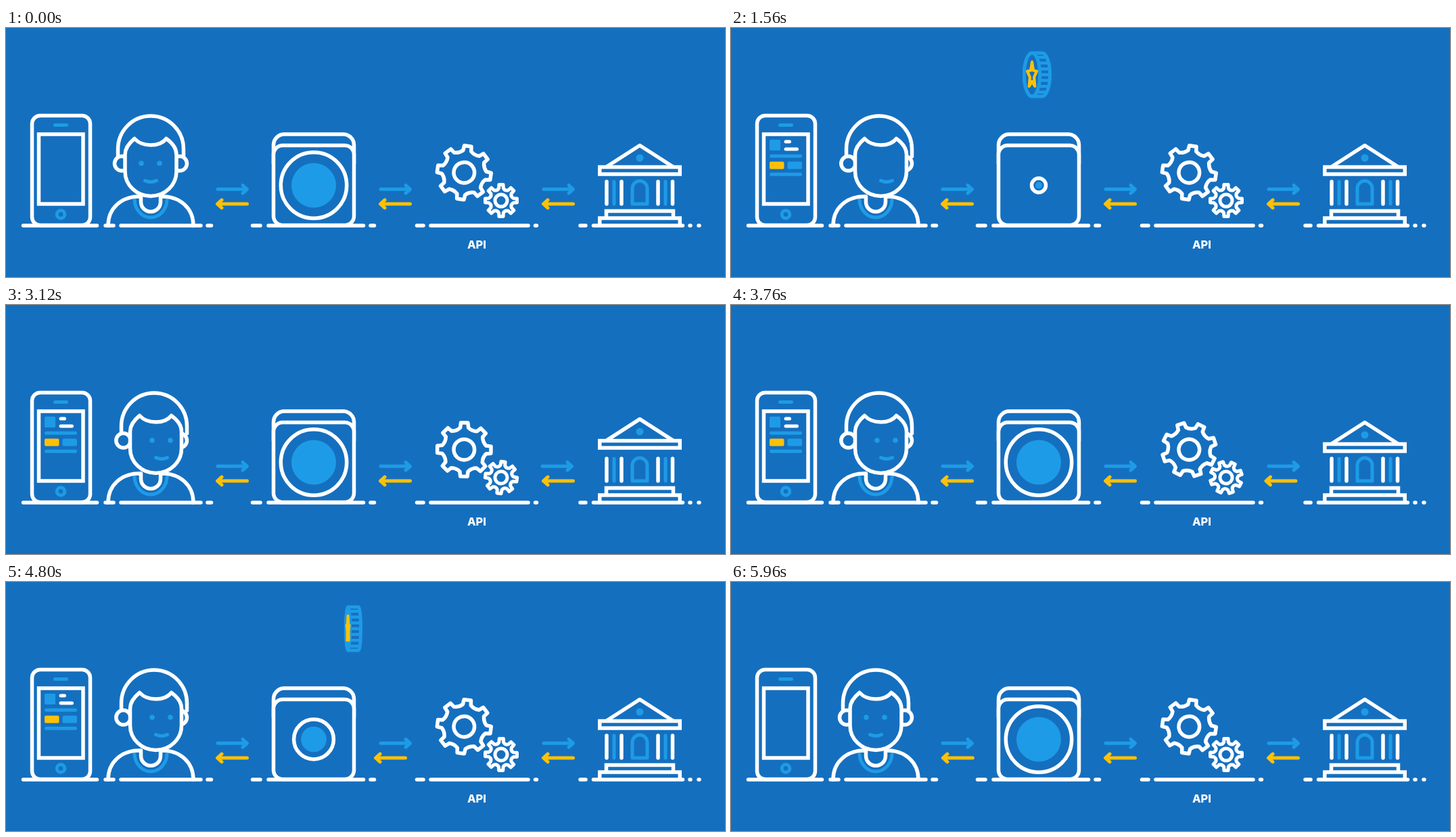
Recreate the animation shown at these times as an HTML page. Size 1063 by 368 pixels, loop 6000 ms.

```html
<!DOCTYPE html>
<html lang="en">
<head>
<meta charset="utf-8">
<title>API flow</title>
<style>
  html, body { margin: 0; width: 100%; height: 100%; overflow: hidden; background: #156fbf; }
  svg { display: block; width: 100%; height: 100%; }
  .l { fill: none; stroke: #fff; stroke-width: 5.5; stroke-linecap: round; stroke-linejoin: round; }
  .b { stroke: #1e9be6; stroke-width: 5; }
  .y { stroke: #ffc107; stroke-width: 5; }
  .s { fill: #156fbf; }
  .fb { fill: #1e9be6; }
  .fy { fill: #ffc107; }
  text { fill: #fff; font: 800 16.5px Inter, "Open Sans", sans-serif; text-anchor: middle; }
</style>
</head>
<body>
<svg viewBox="0 0 1063 368">
  <rect class="s" width="1063" height="368"/>

  <g id="coin">
    <path id="hull" class="l b s"/>
    <path id="ribs" class="l b" style="stroke-width:4.5;stroke-linecap:butt"/>
    <ellipse id="face" class="l b s" ry="32"/>
    <path id="star" class="l y" style="stroke-width:4.2"/>
  </g>

  <g id="phone">
    <rect class="l" x="38.5" y="129.5" width="86" height="162" rx="12"/>
    <rect class="l" x="48.5" y="157" width="65.5" height="103" style="stroke-linejoin:miter"/>
    <path class="l b" d="M72.5 143.5H89.5"/>
    <circle class="l b" cx="81" cy="275.5" r="5.8"/>
    <g id="items">
      <rect class="fb" x="57" y="165" width="16" height="16" rx="1.5"/>
      <path class="l" d="M81 168H86.5" style="stroke-width:5"/>
      <path class="l" d="M81 179H97.5" style="stroke-width:5"/>
      <path class="l b" d="M59.5 189.3H102.5"/>
      <rect class="fy" x="57" y="197.5" width="21.5" height="11" rx="2"/>
      <rect class="fb" x="83.5" y="197.5" width="21.5" height="11" rx="2"/>
      <path class="l b" d="M59.5 216.3H102.5"/>
    </g>
  </g>

  <g id="user">
    <path class="l b" d="M190 253A24 27 0 0 0 238 253"/>
    <path class="l" d="M151 292C151 266 171 249 197 249H199.500V257A14.500 14.500 0 0 0 228.500 257V249H231C257 249 277 266 277 292"/>
    <path id="hair" class="l" d="M165.500 190V179A48.500 49 0 0 1 262.500 179V190"/>
    <circle id="earL" class="l s" cy="200.3" r="10.700"/>
    <circle class="l s" cx="256.800" cy="200.3" r="10.700"/>
    <g id="head">
      <path class="l s" d="M176 212V187C176 177 182 170 190 163.500C196 170 204 173 214 173S232 170 237 163.500C246 170 252 177 252 187V212A38 36.500 0 0 1 176 212Z"/>
    </g>
    <g id="look">
      <ellipse class="fb" cx="200" cy="200" rx="3.8"/>
      <ellipse class="fb" cx="227" cy="200" rx="3.8"/>
      <path class="l b" d="M205.500 225.500Q214 229.500 222.500 225.500"/>
    </g>
  </g>

  <g id="wallet">
    <path class="l s" d="M395.500 200V173A16 16 0 0 1 411.500 157H498.500A16 16 0 0 1 514.500 173V200"/>
    <rect class="l s" x="395.500" y="173.500" width="119" height="118" rx="13.500"/>
    <circle id="ring" class="l s" cx="455" cy="232.500"/>
    <circle id="disc" class="fb" cx="455" cy="232.500"/>
  </g>

  <g id="gears">
    <g id="big"></g>
    <g id="small"></g>
  </g>
  <text x="696" y="325.5">API</text>

  <g id="bank">
    <g id="roof">
      <path class="l" d="M888 205L937 173.500L986 205"/>
      <circle class="fb" cx="937" cy="192" r="5.5"/>
      <rect class="l" x="877.800" y="205.500" width="118.500" height="10.500" style="stroke-linejoin:miter"/>
    </g>
    <path class="l" d="M888 227V260M910 227V260M964 227V260M985.500 227V260"/>
    <path class="l b" d="M899 227V260M975 227V260M926 260V237A11 11 0 0 1 948 237V260Z"/>
    <path class="l" d="M887.500 281V270.500H986.500V281M877.800 291.500V281H996.300V291.500" style="stroke-linejoin:miter"/>
  </g>

  <path class="l" d="M25.500 292H134.500M147 292H159M170 292H288M298 292H303.500M364.500 292H376M388 292H528.500M539 292H544.500M607.500 292H617M628 292H772M782.500 292H784.500M849 292H857M868.500 292H1000.500M1011 292h1M1024 292h1"/>
  <g id="arrows"></g>
</svg>
<script>
const $ = id => document.getElementById(id);
const set = (el, attrs) => { for (const k in attrs) el.setAttribute(k, attrs[k]); };
const mix = (a, b, u) => a + (b - a) * u;
const span = (t, a, b) => Math.min(1, Math.max(0, (t - a) / (b - a)));
const sine = u => (1 - Math.cos(Math.PI * u)) / 2;
const cubic = u => u < .5 ? 4 * u ** 3 : 1 - (2 - 2 * u) ** 3 / 2;
const back = u => 1 + 2.2 * (u - 1) ** 3 + 1.2 * (u - 1) ** 2;
const polar = (r, deg) => {
  const a = deg * Math.PI / 180;
  return (r * Math.sin(a)).toFixed(2) + ' ' + (-r * Math.cos(a)).toFixed(2);
};

function gear(tip, root, hole, width) {
  let d = '';
  for (let i = 0; i < 8; i++) {
    const a = i * 45;
    d += (i ? 'L' : 'M') + polar(root, a - 10.5) + 'L' + polar(tip, a - 7.5) +
      'L' + polar(tip, a + 7.5) + 'L' + polar(root, a + 10.5) +
      'Q' + polar(root - 3.5, a + 22.5) + ' ' + polar(root, a + 34.5);
  }
  const w = `style="stroke-width:${width}"`;
  return `<path class="l s" ${w} d="${d}Z"/><circle class="l" ${w} r="${hole}"/>`;
}
$('big').innerHTML = gear(40, 33, 15.3, 5.5);
$('small').innerHTML = gear(23.7, 18.5, 9, 5);

// direction and start time of each nudge
const arrows = [
  [0, 1, 360], [1, 1, 1660], [2, 1, 2520],
  [2, -1, 3680], [1, -1, 4560], [0, -1, 5240]
].map(([slot, dir, start]) => {
  const el = document.createElementNS('http://www.w3.org/2000/svg', 'path');
  set(el, dir > 0
    ? { class: 'l b', d: 'M313 238.300H356M350 232.500L356.500 238.300L350 244.100' }
    : { class: 'l y', d: 'M356.500 260H313M319 254.200L312.500 260L319 265.800' });
  $('arrows').append(el);
  return { el, x: slot * 241, dir, start };
});

// out, a small overshoot, then rest
function nudge(p) {
  if (p < 0 || p > 760) return 0;
  return p < 480 ? 7 * Math.sin(Math.PI * p / 480) : -2 * Math.sin(Math.PI * (p - 480) / 280);
}

function drawCoin(x, y, deg) {
  const a = deg * Math.PI / 180, c = Math.cos(a);
  const rx = Math.max(.5, 32 * Math.abs(c));
  const off = 8 * Math.sin(a) * (c < 0 ? -1 : 1);
  const side = off < 0 ? 1 : -1, h = Math.abs(off);
  $('coin').setAttribute('transform', `translate(${x} ${y})`);
  $('hull').setAttribute('d',
    `M${-h} -32H${h}A${rx} 32 0 0 1 ${h} 32H${-h}A${rx} 32 0 0 1 ${-h} -32Z`);
  let ribs = '';
  for (let k = -3; k <= 3; k++) {
    const yy = k * 8.6, edge = rx * Math.sqrt(1 - (yy / 32) ** 2);
    ribs += `M${off + side * edge} ${yy}h${side * 2 * h}`;
  }
  $('ribs').setAttribute('d', ribs);
  set($('face'), { cx: off, rx });
  let star = '';
  for (let i = 0; i < 10; i++) {
    const r = i % 2 ? 9 : 20, b = i * Math.PI / 5;
    star += (i ? 'L' : 'M') + (off + r * Math.sin(b) * rx / 32) + ' ' + (1 - r * Math.cos(b));
  }
  $('star').setAttribute('d', star + 'Z');
}

function coinAt(t) {
  const out = t > 1140 && t < 2420, home = t > 4080 && t < 5290;
  $('coin').style.display = out || home ? '' : 'none';
  if (out) {
    const x = mix(452.5, 675, sine(span(t, 1560, 2080)));
    const y = mix(mix(195, 69, sine(span(t, 1160, 1560))), 214, span(t, 2000, 2400) ** 2);
    drawCoin(x, y, -69 + (t - 1560) * .28);
  } else if (home) {
    const x = mix(673.5, 453.5, sine(span(t, 4500, 4963)));
    const y = mix(mix(214, 69, sine(span(t, 4100, 4540))), 192, span(t, 4963, 5287) ** 2);
    drawCoin(x, y, 50 - (t - 4320) * .28);
  }
}

const items = [...$('items').children].map(el => ({ el, box: el.getBBox() }));
const eyes = $('look').querySelectorAll('ellipse');

function draw(t) {
  items.forEach(({ el, box }, i) => {
    const k = sine(span(t, 140 + i * 50, 380 + i * 50)) * (1 - sine(span(t, 5780 - i * 50, 5950 - i * 50)));
    el.style.display = k < .01 ? 'none' : '';
    el.setAttribute('transform', `translate(${box.x * (1 - k)} 0) scale(${k} 1)`);
  });

  const turn = cubic(span(t, 160, 720)) - cubic(span(t, 5380, 5920));
  const shift = (id, d) => $(id).setAttribute('transform', `translate(${d * turn} 0)`);
  shift('hair', 5);
  shift('head', 7.5);
  shift('look', 16);
  $('earL').setAttribute('cx', mix(171.2, 173.5, turn));
  const lid = Math.max(0, 1 - 1.5 * Math.sin(Math.PI * span(t, 1460, 1660)));
  eyes.forEach(e => e.setAttribute('ry', 3.8 * lid));

  const ring = 1 - sine(span(t, 840, 1140)) + sine(span(t, 1640, 1980))
    - sine(span(t, 4640, 4960)) + sine(span(t, 5420, 5800));
  const disc = 1 - sine(span(t, 840, 1140)) + back(span(t, 1700, 2200))
    - sine(span(t, 4640, 4960)) + back(span(t, 5480, 5940));
  $('ring').setAttribute('r', mix(10.5, 48.7, ring));
  $('disc').setAttribute('r', Math.max(0, Math.min(mix(5, 33, disc), mix(6, 44, ring))));

  const rot = 90 * sine(span(t, 1600, 5000));
  $('big').setAttribute('transform', `translate(677.3 213.7) rotate(${8 + rot})`);
  $('small').setAttribute('transform', `translate(732 255) rotate(${-rot})`);

  const hop = 13 * Math.sin(Math.PI * span(t, 3060, 3560)) - 1.5 * Math.sin(Math.PI * span(t, 3560, 3740));
  $('roof').setAttribute('transform', `translate(0 ${-hop})`);

  arrows.forEach(a => a.el.setAttribute('transform', `translate(${a.x + a.dir * nudge(t - a.start)} 0)`));
  coinAt(t);
}

function tick() {
  draw(performance.now() % 6000);
  requestAnimationFrame(tick);
}
tick();
</script>
</body>
</html>
```
